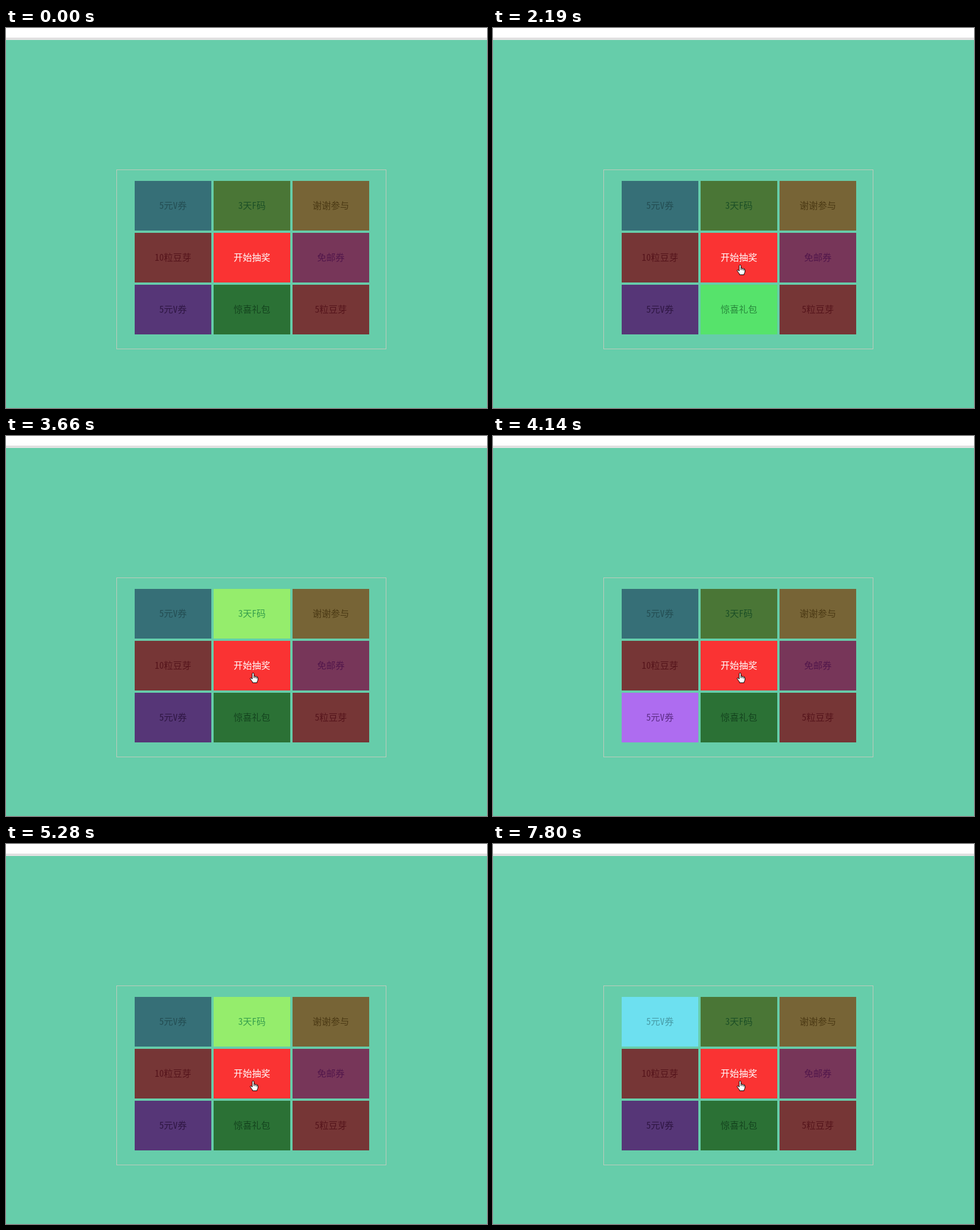
Recreate the animation shown at these times as an HTML page. Size 841x666 px, loop 8 s.

```html
<!DOCTYPE html>
<html lang="zh-CN">
<head>
<meta charset="utf-8">
<title>抽奖</title>
<style>
html, body { margin: 0; width: 100%; height: 100%; overflow: hidden; background: #66cdaa; }
svg { display: block; width: 841px; height: 666px; }
text {
  font: 16px "Noto Sans Mono CJK SC", "Noto Sans CJK SC", "Noto Sans CJK", sans-serif;
  text-anchor: middle;
}
.cursor path { fill: #fff; stroke: #000; stroke-linejoin: round; }
</style>
</head>
<body>
<svg id="stage" viewBox="0 0 841 666">
  <rect width="841" height="666" fill="#66cdaa"/>
  <rect width="841" height="17" fill="#fff"/>
  <rect y="17" width="841" height="4" fill="#e3e3e3"/>
  <rect y="17" width="841" height="1" fill="#d6d6d6"/>
  <rect x="193.5" y="248.5" width="471" height="314" fill="none" stroke="#c2cbbd"/>
  <g id="board"></g>
  <g id="cursor" class="cursor">
    <path id="arrow" d="M.5 .5V16.5L4.2 13L6.6 18.5L8.9 17.5L6.5 12.2H11.5Z"/>
    <g id="hand">
      <path d="M-1.5 1.2Q0 -.8 1.5 1.2V6Q3 5 4 6.5Q5.7 5.7 6.5 7.3Q8.5 6.6 8.5 9V12Q8.5 14 7 15.5V17.5H-1V16Q-3 13.5 -5 10.5Q-5.5 8.5 -3.5 9L-1.5 11Z"/>
      <path d="M1.5 6V9M4 6.5V9.5M6.5 7.3V10"/>
    </g>
  </g>
</svg>
<script>
const LOOP = 8000, TICK = 30;
const $ = id => document.getElementById(id);

// Clockwise from the top left: column, row, label, fill, text colour
const prizes = [
  [0, 0, "5元V券", "#6de0f0", "#479ba6"],
  [1, 0, "3天F码", "#95ed6c", "#379f4c"],
  [2, 0, "谢谢参与", "#f0ca6c", "#967228"],
  [2, 1, "免邮券", "#f06cb4", "#a42c96"],
  [2, 2, "5粒豆芽", "#ee6c6c", "#aa2836"],
  [1, 2, "惊喜礼包", "#56e36b", "#288a3c"],
  [0, 2, "5元V券", "#ae6cf0", "#5c2c86"],
  [0, 1, "10粒豆芽", "#ee6c6c", "#aa2836"]
];

// Ticks between highlight moves: speeding up, cruising, slowing down
const gaps = [22, 16, 13, 10, 5, 7, 7, 6, 7,
  3, 4, 3, 3, 3, 3, 3, 3, 4, 3, 3, 4, 3, 3, 3, 4, 3,
  3, 3, 3, 3, 4, 3, 3, 6, 10, 10, 13, 12, 13, 13, 13];

function add(tag, attrs, label = "") {
  const el = document.createElementNS("http://www.w3.org/2000/svg", tag);
  for (const key in attrs) el.setAttribute(key, attrs[key]);
  el.textContent = label;
  $("board").append(el);
  return el;
}

function cell([col, row, label, fill, ink]) {
  const x = 225 + col * 138, y = 268 + row * 91;
  const box = { x, y, width: 134, height: 87 };
  add("rect", { ...box, fill });
  add("text", { x: x + 67, y: y + 49, fill: ink }, label);
  return box;
}

const shades = prizes.map(p => add("rect", { ...cell(p), fill: "#000", opacity: 0.5 }));
cell([1, 1, "开始抽奖", "#fa3333", "#fff"]);

function activeStep(t) {
  let at = 0, step = -1;
  for (const gap of gaps) {
    at += gap * TICK;
    if (t < at) break;
    step++;
  }
  return step;
}

function drawCursor(t) {
  const p = Math.min(1, Math.max(0, Math.floor((t - 120) / TICK) / 12));
  const ease = 1 - (1 - p) ** 2;
  const x = Math.round(821 - 389 * ease), y = Math.round(49 + 366 * ease);
  const over = x >= 363 && x < 497 && y >= 359 && y < 446;
  $("cursor").setAttribute("transform", `translate(${x} ${y})`);
  $("cursor").style.display = t < 120 ? "none" : "";
  $("arrow").style.display = over ? "none" : "";
  $("hand").style.display = over ? "" : "none";
}

function render(t) {
  const step = activeStep(t);
  shades.forEach((el, i) => {
    el.style.display = step >= 0 && step % 8 === i ? "none" : "";
  });
  drawCursor(t);
}

const start = performance.now();
function frame() {
  render((performance.now() - start) % LOOP);
  requestAnimationFrame(frame);
}
frame();
</script>
</body>
</html>
```
